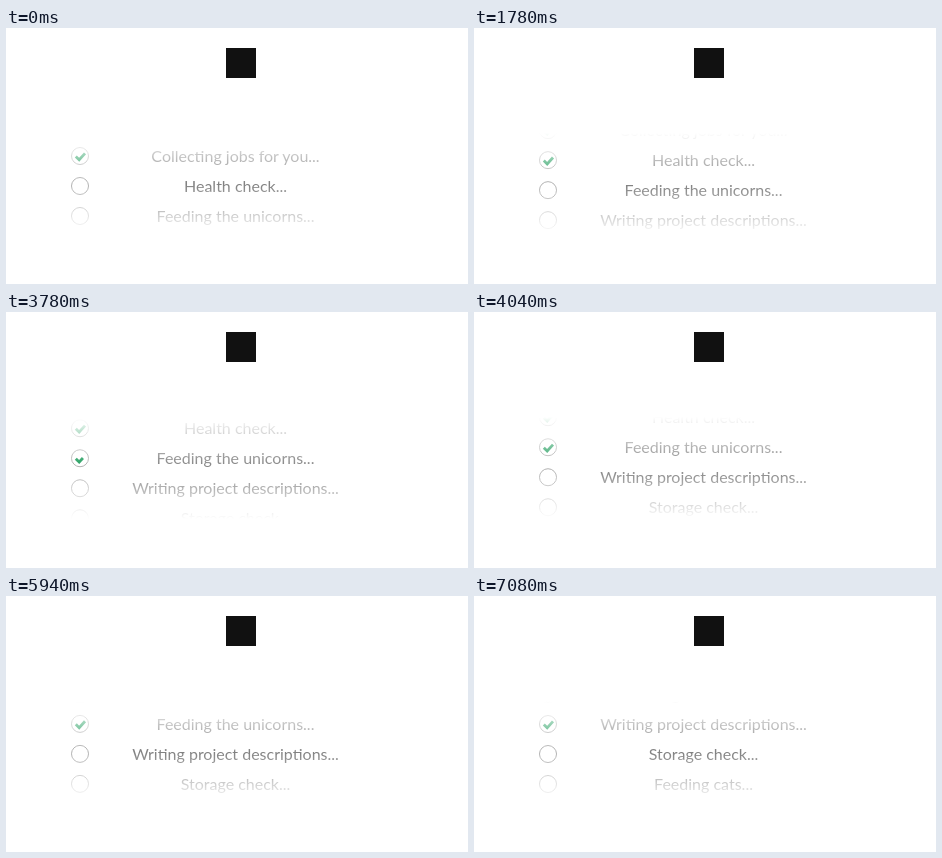
Write an HTML page that moves like this. It is 462 px wide and 256 px high and loops after 8 s.

```html
<!DOCTYPE html>
<html lang="en">
<head>
<meta charset="utf-8">
<title>Loading checklist</title>
<style>
  html, body { margin: 0; height: 100%; overflow: hidden; background: #fff; }
  svg { display: block; width: 462px; height: 256px; }
  text { font: 16px Lato, "Open Sans", sans-serif; text-anchor: middle; fill: #808080; }
  circle { fill: none; stroke: #b0b0b0; }
  .check { fill: none; stroke: #1a9a58; stroke-width: 2.8; }
</style>
</head>
<body>
<svg viewBox="0 0 462 256">
  <defs>
    <linearGradient id="fade" gradientUnits="userSpaceOnUse" x1="0" y1="105" x2="0" y2="207">
      <stop offset="0" stop-color="#fff" stop-opacity="0"/>
      <stop offset=".5" stop-color="#fff"/>
      <stop offset="1" stop-color="#fff" stop-opacity="0"/>
    </linearGradient>
    <mask id="window" maskUnits="userSpaceOnUse" x="0" y="105" width="462" height="102" style="mask-type: alpha">
      <rect y="105" width="462" height="102" fill="url(#fade)"/>
    </mask>
  </defs>
  <rect x="220" y="20" width="30" height="30" fill="#111"/>
  <g mask="url(#window)"><g id="list"></g></g>
</svg>
<script>
const LOOP = 8000, ROW = 30, SCROLL = 1200, DELAY = 60, DRAW = 300;
const starts = [1100, 3490, 5930];
const phrases = [
  "Collecting jobs for you...", "Health check...", "Feeding the unicorns...",
  "Writing project descriptions...", "Storage check...", "Feeding cats..."
];
const list = document.getElementById("list");
list.innerHTML = phrases.map((phrase, i) => `
  <g transform="translate(0 ${128 + i * ROW})">
    <circle cx="74" cy="0" r="8.5"/>
    <path class="check" pathLength="1" d="M69.8 .4L73.2 3.8L79 -2.6"/>
    <text x="229.5" y="6">${phrase}</text>
  </g>`).join("");
const checks = [...list.querySelectorAll(".check")];

const clamp = v => Math.min(1, Math.max(0, v));
const bezier = (a, b, u) => 3 * a * u * (1 - u) ** 2 + 3 * b * u * u * (1 - u) + u ** 3;

// The standard CSS "ease" curve, solved by bisection
function ease(x) {
  if (x <= 0 || x >= 1) return clamp(x);
  let lo = 0, hi = 1;
  for (let i = 0; i < 24; i++) {
    const mid = (lo + hi) / 2;
    if (bezier(.25, .25, mid) < x) lo = mid; else hi = mid;
  }
  return bezier(.1, 1, lo);
}

function render(now) {
  const t = now % LOOP;
  const steps = starts.reduce((sum, s) => sum + ease((t - s) / SCROLL), 0);
  list.setAttribute("transform", `translate(0 ${-ROW * steps})`);
  checks.forEach((check, i) => {
    const start = i ? starts[i - 1] ?? LOOP : -LOOP;
    const drawn = clamp((t - start - DELAY) / DRAW);
    check.style.visibility = drawn > 0 ? "visible" : "hidden";
    check.setAttribute("stroke-dasharray", `${drawn} 2`);
  });
  requestAnimationFrame(render);
}
render(performance.now());
</script>
</body>
</html>
```
